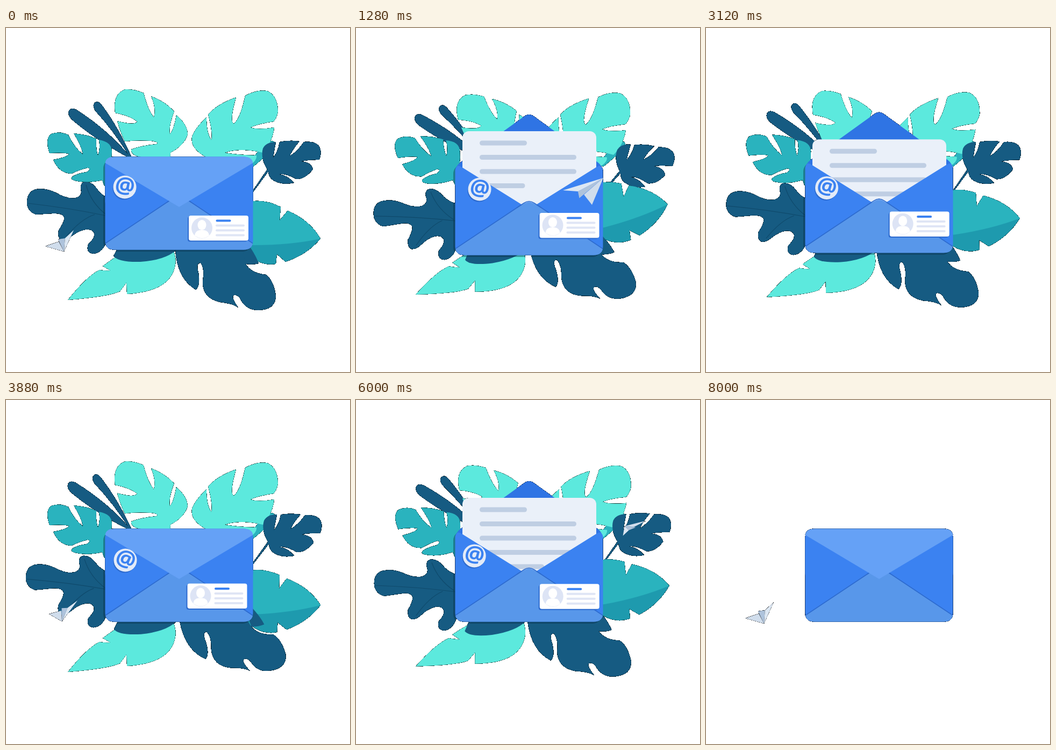
These frames come from a looping animation (640 px wide and 640 px high, 8.04 s). An HTML page with a canvas:

```html
<!DOCTYPE html>
<html lang="en">
<head>
<meta charset="utf-8">
<title>Envelope</title>
<style>
html, body { margin: 0; width: 100%; height: 100%; overflow: hidden; background: #fff; }
canvas { display: block; width: 640px; height: 640px; filter: url(#edge); }
svg { position: absolute; }
</style>
</head>
<body>
<svg width="0" height="0">
  <!-- dark rim where the silhouette meets the white stage -->
  <filter id="edge" x="0" y="0" width="1" height="1" color-interpolation-filters="sRGB">
    <feComponentTransfer in="SourceAlpha" result="rim">
      <feFuncA type="discrete" tableValues="0 1 1 1 1 1"/>
    </feComponentTransfer>
    <feMerge><feMergeNode in="rim"/><feMergeNode in="SourceGraphic"/></feMerge>
  </filter>
</svg>
<canvas id="stage" width="640" height="640"></canvas>
<script>
const ctx = document.getElementById('stage').getContext('2d');
const LOOP = 8040, STEP = 40, CYCLE = 8000, HALF = 4000;
const MINT = '#5ce9dd', TEAL = '#2ab3be', DEEP_TEAL = '#1e9aae', NAVY = '#165b82', VEIN = '#0f4a6c';
const BLUE = '#3b82f1', SHADE = '#2d6bcf';

// Smooth periodic curve through (times, values).
function spline(t, times, values, period) {
  const n = times.length;
  const time = k => times[(k + n) % n] + Math.floor(k / n) * period;
  const val = k => values[(k + n) % n];
  const slope = k => (val(k + 1) - val(k)) / (time(k + 1) - time(k));
  const tangent = k => {
    const before = time(k) - time(k - 1), after = time(k + 1) - time(k);
    return (slope(k - 1) * after + slope(k) * before) / (before + after);
  };
  t %= period;
  let i = n - 1;
  while (times[i] > t) i--;
  const h = time(i + 1) - time(i), u = (t - time(i)) / h, v = 1 - u;
  return v * v * (1 + 2 * u) * val(i) + u * v * v * h * tangent(i)
    + u * u * (3 - 2 * u) * val(i + 1) - u * u * v * h * tangent(i + 1);
}

const KEYS = [0, 1280, 2400, 3880, 5200, 6840];
const sway = (t, values) => spline(t, KEYS, values, CYCLE);
const FLIGHT = [0, 1200, 1280, 2400, 3880];
const flight = (t, values) => spline(t, FLIGHT, values, HALF);

const ease = (t, from, to) => {
  const u = Math.min(1, Math.max(0, (t - from) / (to - from)));
  return u * u * (3 - 2 * u);
};
const mix = (a, b, u) => a + (b - a) * u;

function fill(path, color) {
  ctx.fillStyle = color;
  ctx.fill(typeof path === 'string' ? new Path2D(path) : path);
}
function stroke(path, color, width) {
  ctx.strokeStyle = color;
  ctx.lineWidth = width;
  ctx.stroke(new Path2D(path));
}
function box(x, y, w, h, r, color) {
  ctx.fillStyle = color;
  ctx.beginPath();
  ctx.roundRect(x, y, w, h, r);
  ctx.fill();
}
function disc(x, y, rx, ry, color) {
  ctx.fillStyle = color;
  ctx.beginPath();
  ctx.ellipse(x, y, rx, ry, 0, 0, 7);
  ctx.fill();
}

const blades = 'M232 241Q193 192 131 152Q121 147 117 154Q114 161 122 170Q165 207 226 240Z'
  + 'M234 241Q210 186 178 143Q171 134 165 139Q160 144 166 154Q200 191 231 241Z';
const monsteraLeft = 'M298 262V240Q265 243 246 239Q232 235 233 226Q250 219 280 216Q286 212 270 210'
  + 'Q245 208 221 211Q212 192 207 173Q240 182 244 174Q230 163 203 158Q198 122 222 114Q238 113 256 121'
  + 'Q264 152 275 166Q280 150 270 127Q295 136 313 155Q302 185 305 197Q312 190 317 162'
  + 'Q338 180 338 198Q332 218 306 232L305 262Z';
const monsteraRight = 'M385 262L372 240Q342 224 346 202Q352 186 373 166Q373 196 382 208Q385 195 376 161'
  + 'Q392 142 428 129Q415 175 424 178Q436 168 445 126Q466 114 486 117Q506 126 506 156'
  + 'Q504 167 498 174Q470 178 455 185Q468 190 499 185Q496 212 478 232Q435 222 407 232'
  + 'Q430 236 466 237Q468 250 440 262Z';
const smallLeft = 'M182 292L179 283Q150 290 128 284Q118 281 124 276Q134 270 150 268Q160 262 152 260'
  + 'Q136 264 122 271Q98 270 88 245Q116 240 117 234Q105 231 81 233Q72 206 84 197Q100 191 116 199'
  + 'Q127 222 143 235Q141 221 126 196Q150 198 168 206Q167 226 171 237Q176 224 173 208'
  + 'Q197 212 197 230Q197 255 186 276L190 300Z';
const smallRight = 'M486 263Q473 242 478 224Q484 212 502 212Q499 228 497 241Q506 230 509 212'
  + 'Q528 208 546 211Q533 226 528 238Q542 230 554 212Q572 210 581 218Q589 228 583 245'
  + 'Q562 245 549 248Q569 250 571 263Q556 282 540 281Q520 270 508 272Q524 274 536 288'
  + 'Q515 293 498 284Q489 279 488 267L460 305L458 304Z';
const oak = 'M39 328Q38 304 56 300Q74 297 94 307Q115 319 130 316Q143 312 139 299Q138 287 148 286'
  + 'Q160 286 170 300Q180 315 205 322V400H186Q178 419 162 420Q148 418 153 402Q166 390 164 382'
  + 'Q160 373 148 375Q136 377 124 386Q112 396 103 394Q95 390 98 376Q110 358 108 352'
  + 'Q105 344 88 345L56 347Q42 343 39 328Z';
const oakVeins = 'M40 326Q120 335 190 350M149 292Q158 325 186 347M112 388Q140 355 165 347';
const lens = 'M200 424Q208 436 250 435Q295 432 316 414L295 396H215Z';
const broad = 'M430 330Q470 312 511 333L509 358L524 340Q566 358 585 392Q560 422 520 435'
  + 'L504 421L502 439Q475 443 453 424L440 400Z';
const broadTop = 'M430 330Q470 312 511 333L509 358L524 340Q566 358 585 392Q530 404 460 404L425 400Z';
const feather = 'M115 506Q150 462 174 450Q184 452 194 451L180 443Q210 420 250 400H305'
  + 'Q318 424 315 440Q308 490 225 495L224 474L212 490Q190 500 115 506Z';
const lobed = 'M315 395V412Q318 466 353 487Q362 480 358 455Q353 437 362 437Q370 448 366 470'
  + 'Q364 502 398 510Q420 512 432 520Q418 500 424 497Q432 495 438 508Q448 525 470 525'
  + 'Q502 524 502 498Q498 470 484 459Q456 456 446 439L452 412L445 395Z';
const lobeTip = 'M436 395L446 439Q460 441 470 438Q464 420 445 395Z';

const leaves = [
  { at: [232, 240], turn: [0, -5.3, -4.2, -1, -1, -5.3], parts: [[blades, NAVY]] },
  { at: [180, 270], turn: [0, -5.2, -5.2, 0, -2, -5.2], parts: [[smallLeft, TEAL]] },
  { at: [455, 260], turn: [0, 1, 0, 0, 1, -1],
    parts: [['M452 255Q470 222 490 211Q501 208 500 217Q494 230 460 258Z', TEAL]] },
  { at: [300, 270], turn: [0, -7, -5.1, -.1, -6.4, -3.1], parts: [[monsteraLeft, MINT]] },
  { at: [378, 262], turn: [0, 2.3, 3.5, 0, 2.3, 2.9], parts: [[monsteraRight, MINT]] },
  { at: [455, 312], turn: [0, 5.3, .3, 1.3, 3.7, -3], parts: [[smallRight, NAVY]] },
  { at: [325, 352], wave: -8, parts: [[lobed, NAVY]] },
  { at: [331, 380], turn: [0, -14.5, -14.7, -2.3, -5.2, -12.9],
    parts: [[broad, DEEP_TEAL], [broadTop, TEAL]] },
  { at: [325, 352], wave: -8, parts: [[lobeTip, NAVY]] },
  { at: [300, 425], turn: [0, 3.1, 3.4, 0, 2.5, 2.8], parts: [[feather, MINT]] },
  { at: [276, 398], turn: [0, -5.7, -1.9, -1.7, -5.5, -2.4],
    parts: [[oak, NAVY], [lens, NAVY]], veins: oakVeins }
];

function drawLeaf(leaf, t) {
  const [x, y] = leaf.at;
  const angle = leaf.wave
    ? leaf.wave * Math.sin(3 * Math.PI * t / CYCLE) ** 2
    : sway(t, leaf.turn);
  ctx.save();
  ctx.translate(x, y);
  ctx.rotate(angle * Math.PI / 180);
  ctx.translate(-x, -y);
  for (const [path, color] of leaf.parts) fill(path, color);
  if (leaf.veins) stroke(leaf.veins, VEIN, 1.2);
  ctx.restore();
}

function drawPlane(t) {
  const point = (xs, ys) => [flight(t, xs), flight(t, ys)];
  const nose = point([108, 439, 460, 460, 104], [416, 289, 279, 239, 412]);
  const left = point([126, 363, 385, 497, 133], [376, 312, 302, 250, 373]);
  const right = point([73, 411, 439, 518, 80], [406, 345, 329, 205, 398]);
  const inside = (a, b) => [0, 1].map(k =>
    nose[k] + a * (left[k] - nose[k]) + b * (right[k] - nose[k]));
  const facet = (p, q, color) => fill(`M${nose}L${p}L${q}Z`, color);
  const crease = inside(.56, .24);
  facet(crease, inside(.44, .55), '#aec3dc');
  facet(left, crease, '#dce7f3');
  facet(inside(.35, .46), right, '#d0ddec');
}

function drawLetter(h) {
  const up = ease(h, 350, 880) * (1 - ease(h, 2960, 3420));
  const top = mix(252, 182, up);
  box(198, top, 249, 150, 12, '#eaf0f9');
  let ink = (h - 925) * 1.5;
  ctx.lineCap = 'round';
  [88, 180, 180, 180, 120].forEach((length, i) => {
    const shown = Math.min(length, ink);
    ink -= length;
    if (shown < 9) return;
    const y = top + 22 + i * 26.5;
    stroke(`M234.5 ${y}H${225.5 + shown}`, '#bfcee3', 9);
  });
}

function drawEnvelope(h, bob) {
  const open = ease(h, 40, 500) * (1 - ease(h, 3380, 3760));
  const tip = mix(333, 148, open);
  ctx.save();
  ctx.translate(0, bob);
  if (tip < 245) {
    const side = Math.min(240, tip + 92);
    const y = tip + 7;
    fill(`M185 300V256Q186 246 194 ${side}L312 ${y}Q322 ${tip - 1} 332 ${y}`
      + `L450 ${side}Q458 246 459 256V300Z`, '#2f74e4');
  } else {
    box(184.5, 239.5, 275, 100, 17, '#2f74e4');
  }
  drawLetter(h);
  const front = new Path2D('M184.5 254Q187 242 197 249L322 327L447 249Q457 242 459.5 254'
    + 'V396Q459.5 412.5 442 412.5H202Q184.5 412.5 184.5 396Z');
  fill(front, BLUE);
  ctx.save();
  ctx.clip(front);
  const pocket = 'M180 405L312 317Q322 310 332 317L464 405V420H180Z';
  stroke(pocket, SHADE, 3.5);
  fill(pocket, '#5897ea');
  ctx.restore();
  // the pocket's rounded tip stands above the V of the side flaps
  fill('M300 325L312 317Q322 310 332 317L344 325L322 345Z', '#5897ea');
  stroke('M300 324L312 316Q322 309 332 316L344 324', SHADE, 1.6);
  if (tip >= 245) {
    fill(`M184.5 251Q186 239.5 202 239.5H442Q458 239.5 459.5 251L322 ${tip}Z`, '#65a1f6');
  }
  ctx.restore();
}

function drawBadge(t) {
  ctx.save();
  ctx.translate(sway(t, [221, 230, 226, 222, 210, 231]), sway(t, [296, 300, 297, 298, 295, 287]));
  disc(-1.5, 2.5, 21, 21, SHADE);
  disc(0, 0, 21.5, 21.5, '#e3ebf8');
  ctx.rotate(sway(t, [8, 10, 5, 22, 2, 22]) * Math.PI / 180);
  ctx.fillStyle = BLUE;
  ctx.font = 'bold 41px "Open Sans", sans-serif';
  ctx.textAlign = 'center';
  ctx.fillText('@', 0, 11.5);
  ctx.restore();
}

function drawCard(t) {
  ctx.save();
  ctx.translate(sway(t, [340, 341.5, 345.5, 337.5, 343, 339.5]),
    sway(t, [349, 344, 342, 341.5, 344, 341.5]));
  box(-2, 2, 111, 46.5, 4, SHADE);
  box(0, 0, 111, 46.5, 4, '#fff');
  disc(24.5, 23, 19.5, 19.5, '#dde4f5');
  disc(24.5, 17.5, 8, 9.5, '#fff');
  fill('M11 37Q12 28 21 27H28Q37 28 38 37Q25 47 11 37Z', '#fff');
  box(50.5, 7.5, 28, 4, 2, BLUE);
  for (const y of [16.5, 25.5, 34.5]) box(50, y, 54, 4, 2, '#dfe5f5');
  ctx.restore();
}

function draw(t) {
  const h = t % HALF;
  const dressed = t < CYCLE;
  const bob = t < HALF ? 14 * Math.sin(Math.PI * t / HALF) ** 2 : 0;
  const planeInFront = h < 1900;
  ctx.clearRect(0, 0, 640, 640);
  if (dressed) {
    for (const leaf of leaves) drawLeaf(leaf, t);
    ctx.globalCompositeOperation = 'source-atop';
    box(181, 244 + bob, 276, 172, 17, 'rgba(6, 40, 66, .4)');
    ctx.globalCompositeOperation = 'source-over';
  }
  if (!planeInFront) drawPlane(h);
  drawEnvelope(h, bob);
  if (dressed) {
    drawBadge(t);
    drawCard(t);
  }
  if (planeInFront) drawPlane(h);
}

const start = performance.now();
function tick() {
  const t = (performance.now() - start) % LOOP;
  draw(Math.floor(t / STEP) * STEP);
  requestAnimationFrame(tick);
}
tick();
</script>
</body>
</html>
```
